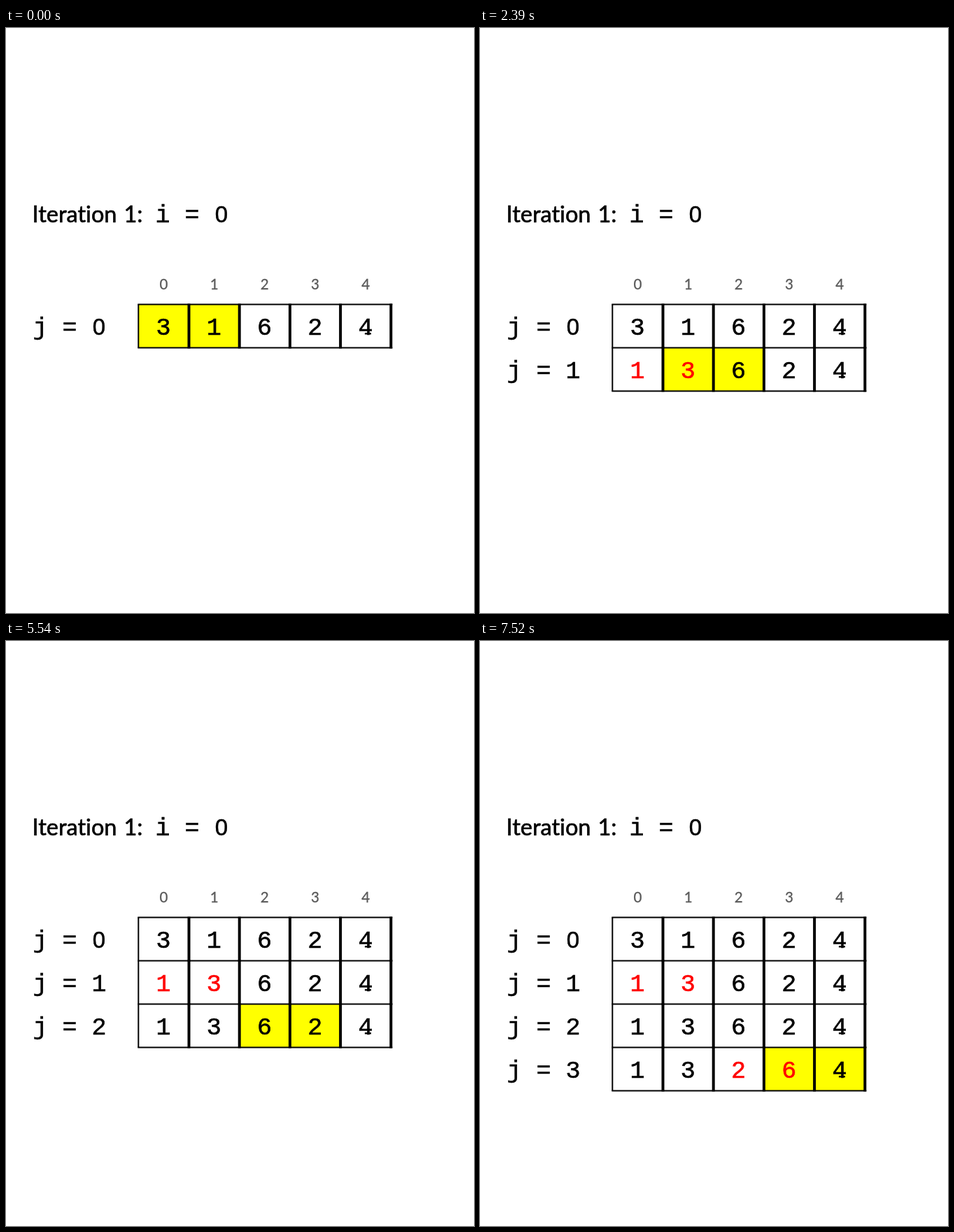
These frames come from a looping animation (669 px wide and 837 px high, 8000 ms). An HTML page:

```html
<!DOCTYPE html>
<html lang="en">
<head>
<meta charset="utf-8">
<title>Bubble sort, first iteration</title>
<style>
  html, body { margin: 0; width: 100%; height: 100%; overflow: hidden; background: #fff; }
  svg { display: block; width: 669px; height: 837px; }
  text { fill: #000; stroke: #000; }
  .title { font: 32.5px Lato, Carlito, sans-serif; font-variant-ligatures: none; stroke-width: .6px; }
  .index { font: 20.5px Lato, Carlito, sans-serif; fill: #595959; stroke: #595959; stroke-width: .3px; text-anchor: middle; }
  .mono { font: 35px "Liberation Mono", monospace; stroke-width: .5px; text-anchor: middle; }
  .zero { font: 33px "Liberation Sans", sans-serif; }
  .cell { stroke-width: .6px; }
  .red { fill: #f00; stroke: #f00; }
  .mark { fill: #ff0; }
  .row, .mark { animation: 8s step-end infinite; }
  .row1 { animation-name: row1; }
  .row2 { animation-name: row2; }
  .row3 { animation-name: row3; }
  .mark0 { animation-name: mark0; }
  .mark1 { animation-name: mark1; }
  .mark2 { animation-name: mark2; }
  @keyframes row1 { 0% { opacity: 0 } 6.25%, 100% { opacity: 1 } }
  @keyframes row2 { 0% { opacity: 0 } 45.625%, 100% { opacity: 1 } }
  @keyframes row3 { 0% { opacity: 0 } 85%, 100% { opacity: 1 } }
  @keyframes mark0 { 0% { opacity: 1 } 6.25%, 100% { opacity: 0 } }
  @keyframes mark1 { 0% { opacity: 1 } 45.625%, 100% { opacity: 0 } }
  @keyframes mark2 { 0% { opacity: 1 } 85%, 100% { opacity: 0 } }
</style>
</head>
<body>
<svg id="stage" viewBox="0 0 669 837"></svg>
<script>
  const LEFT = 189.3, TOP = 395.5, COL = 72.2, ROW = 62;
  const RIGHT = LEFT + COL * 5;
  const rows = [
    { values: "31624", red: [] },
    { values: "13624", red: [0, 1] },
    { values: "13624", red: [] },
    { values: "13264", red: [2, 3] }
  ];
  const stage = document.getElementById("stage");

  function add(parent, tag, attrs, content) {
    const el = document.createElementNS("http://www.w3.org/2000/svg", tag);
    for (const key in attrs) el.setAttribute(key, attrs[key]);
    if (content !== undefined) el.textContent = content;
    parent.append(el);
    return el;
  }

  const write = (parent, x, y, cls, content) =>
    add(parent, "text", { x, y, class: cls }, content);

  const line = (parent, x1, y1, x2, y2, width) =>
    add(parent, "path", { d: `M${x1} ${y1}L${x2} ${y2}`, stroke: "#000", "stroke-width": width });

  function equation(parent, x, y, name, value) {
    write(parent, x, y, "mono", name);
    write(parent, x + 42, y, "mono", "=");
    write(parent, x + 84, y, value ? "mono" : "mono zero", value);
  }

  function drawRow({ values, red }, r) {
    const g = add(stage, "g", { class: `row row${r}` });
    const y = TOP + ROW * r, bottom = y + ROW;
    add(g, "rect", { class: `mark mark${r}`, x: LEFT + COL * r, y, width: COL * 2, height: ROW });
    equation(g, 49, y + 43.6, "j", r);
    [...values].forEach((digit, c) => {
      const x = LEFT + COL * (c + 0.5) - 0.3, base = y + 43;
      write(g, x, base, red.includes(c) ? "mono cell red" : "mono cell", digit);
      if (digit === "4") line(g, x - 1, base - 1.2, x + 8, base - 1.2, 2.4);
      line(g, x + COL / 2 + 0.3, y - 1, x + COL / 2 + 0.3, bottom + 1, 4);
    });
    line(g, LEFT, y, LEFT, bottom, 2);
    if (!r) line(g, LEFT - 1, y, RIGHT + 2, y, 2);
    line(g, LEFT - 1, bottom, RIGHT + 2, bottom, 2);
  }

  // Later rows go underneath, so each shared border stays on top.
  rows.map((row, r) => [row, r]).reverse().forEach(([row, r]) => drawRow(row, r));
  write(stage, 37.6, 278, "title", "Iteration");
  write(stage, 168.4, 278, "title", "1:");
  equation(stage, 224, 278, "i", 0);
  for (let c = 0; c < 5; c++) write(stage, LEFT + COL * (c + 0.5), 373.7, "index", c);
</script>
</body>
</html>
```
